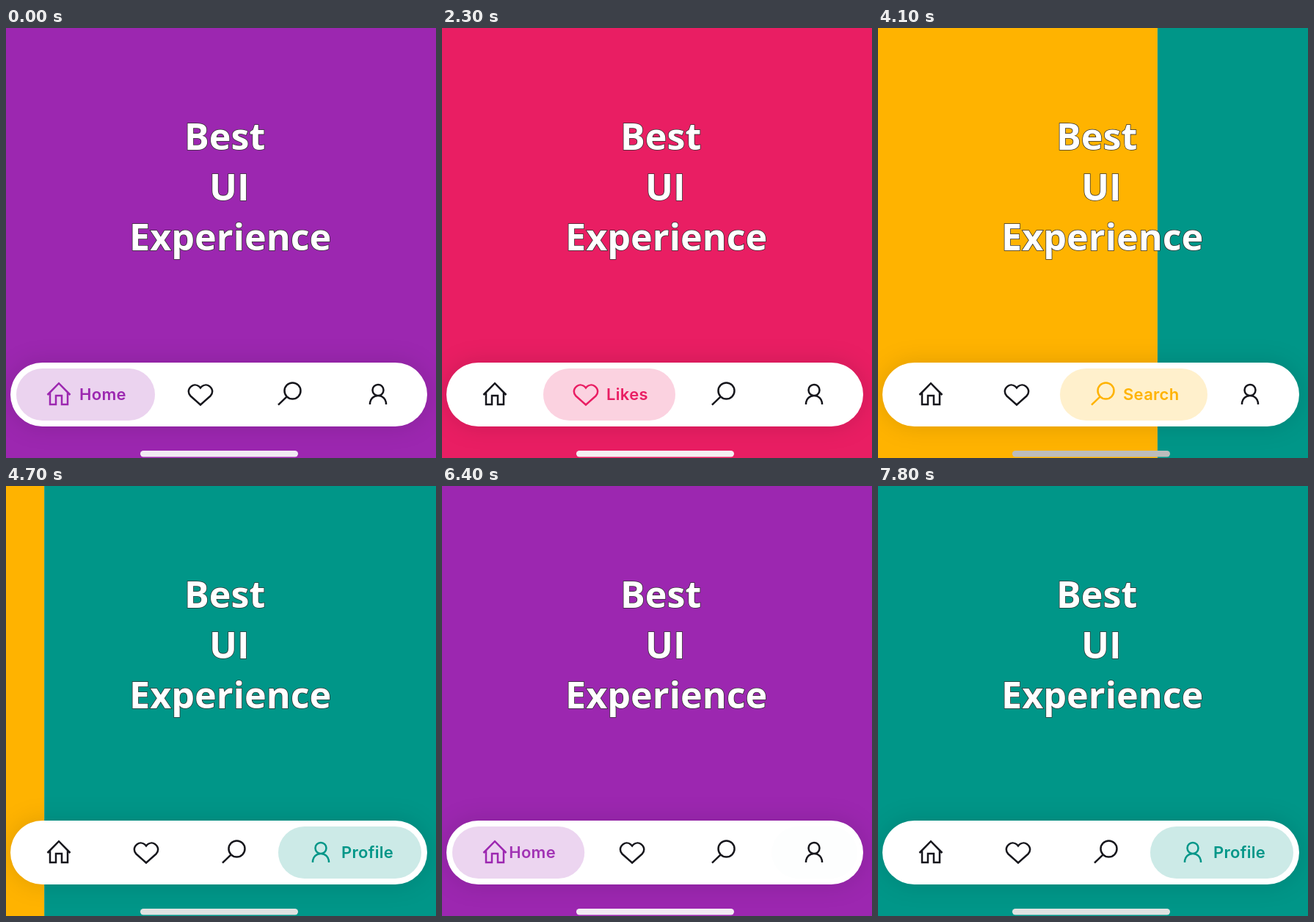
These frames come from a looping animation (586 by 586 pixels, 8 s). An HTML page:

```html
<!DOCTYPE html>
<html lang="en">
<head>
<meta charset="utf-8">
<title>Bottom navigation</title>
<style>
  html, body { margin: 0; width: 100%; height: 100%; overflow: hidden; }
  svg { display: block; width: 586px; height: 586px; }
  .headline {
    font: 700 50.3px "Open Sans", "Noto Sans", sans-serif;
    fill: #fff; stroke: #333; stroke-width: 1.5px; paint-order: stroke;
  }
  .label { font: 600 22px Inter, Roboto, sans-serif; letter-spacing: .3px; }
  .icon { fill: none; stroke-width: 2.5; }
  .bar { fill: #fff; filter: drop-shadow(0 0 16px rgba(0, 0, 0, .13)); }
</style>
</head>
<body>
<svg viewBox="0 0 586 586">
  <g id="pages"></g>
  <g class="headline">
    <text x="243" y="166">Best</text>
    <text x="277" y="234.5">UI</text>
    <text x="168" y="303">Experience</text>
  </g>
  <rect class="bar" x="6" y="456" width="568" height="87" rx="43.5"/>
  <g id="tabs"></g>
  <rect id="handle" x="183" y="576" width="215" height="8.5" rx="4.2"/>
</svg>
<script>
const SIZE = 586, LOOP = 8000, STEP = 100, EXPAND = 400;
const LEFT = 14, RIGHT = 566, TOP = 464, PILL_H = 71, CLOSED = 117, MID_Y = 499;

// extra: how much wider the pill gets when its label is open
const tabs = [
  { text: "Home", color: "#9c27b0", handle: "#f2eaf3", extra: 72,
    icon: "M-15.5 1L0-14.8L15.5 1M-12-2V14H-4V2H4V14H12V-2" },
  { text: "Likes", color: "#e91e63", handle: "#f4f0f2", extra: 63,
    icon: "M0-8.5C-4-13.5-9-13-12-11C-17.5-7-17-1-13.5 2.5L0 14.5L13.5 2.5C17-1 17.5-7 12-11C9-13 4-13.5 0-8.5Z" },
  { text: "Search", color: "#ffb300", handle: "#bcbcbc", extra: 84,
    icon: "M-15 14.7L-3.3 3.3M-6.5-4.5a11 11 0 1 0 22 0a11 11 0 1 0-22 0" },
  { text: "Profile", color: "#009688", handle: "#dfe2e1", extra: 78,
    icon: "M-11 14V13A11 11 0 0 1 11 13V14M-7.5-5.5a7.5 7.5 0 1 0 15 0a7.5 7.5 0 1 0-15 0" }
];

// [time, page position]; two entries at one time make a jump
const scroll = [
  [0, 0], [1050, 0], [1200, .3], [1300, .6485], [1400, .86], [1500, .96], [1650, 1],
  [2600, 1], [2750, 1.28], [2850, 1.5], [2950, 1.78], [3100, 1.95], [3250, 2],
  [3780, 2], [4000, 2.2], [4200, 2.5], [4450, 2.76], [4700, 2.911], [4850, 2.98], [4950, 3],
  [6017, 3], [6017, 0], [7090, 0], [7090, 3], [LOOP, 3]
];
// [time, chosen tab]
const picks = [[-EXPAND, 0], [1274, 1], [2850, 2], [4200, 3], [6017, 0], [7090, 3]];

const add = (parent, tag, attrs) => {
  const el = document.createElementNS("http://www.w3.org/2000/svg", tag);
  set(el, attrs);
  return parent.appendChild(el);
};
function set(el, attrs) {
  for (const key in attrs) el.setAttribute(key, attrs[key]);
}

const pages = document.getElementById("pages");
const tabLayer = document.getElementById("tabs");
const handle = document.getElementById("handle");

tabs.forEach((tab, i) => {
  add(pages, "rect", { x: i * SIZE, width: SIZE, height: SIZE, fill: tab.color });
  tab.pill = add(tabLayer, "rect", { y: TOP, height: PILL_H, rx: PILL_H / 2, fill: tab.color });
  tab.label = add(tabLayer, "text", { class: "label", y: 507, fill: tab.color });
  tab.label.textContent = tab.text;
  tab.mark = add(tabLayer, "path", { class: "icon", d: tab.icon });
});

function pageAt(t) {
  const i = scroll.findIndex(point => point[0] > t);
  const [t0, p0] = scroll[i - 1], [t1, p1] = scroll[i];
  return p0 + (p1 - p0) * (t - t0) / (t1 - t0);
}

function draw(t) {
  const page = pageAt(t);
  set(pages, { transform: `translate(${-page * SIZE} 0)` });
  set(handle, { fill: tabs[Math.round(page)].handle });

  const n = picks.filter(pick => pick[0] <= t).length - 1;
  const [since, active] = picks[n];
  const previous = n ? picks[n - 1][1] : -1;
  const u = Math.min(1, (t - since) / EXPAND);

  const open = tabs.map((_, i) => i === active ? u : i === previous ? 1 - u : 0);
  const widths = tabs.map((tab, i) => CLOSED + tab.extra * open[i] ** 3);
  const gap = (RIGHT - LEFT - widths.reduce((a, b) => a + b)) / (tabs.length - 1);

  let x = LEFT;
  tabs.forEach((tab, i) => {
    const center = x + CLOSED / 2 - .5;
    const fade = open[i] ** (i === active ? 1.7 : 13);
    set(tab.pill, { x, width: widths[i], opacity: .2 * open[i] });
    set(tab.label, { x: center + 28 - tab.extra * (1 - open[i] ** 3), opacity: fade });
    set(tab.mark, {
      transform: `translate(${center} ${MID_Y})`,
      stroke: i === active ? tab.color : "#16161c"
    });
    x += widths[i] + gap;
  });
}

function tick() {
  draw(Math.floor(performance.now() % LOOP / STEP) * STEP);
  requestAnimationFrame(tick);
}
tick();
</script>
</body>
</html>
```
